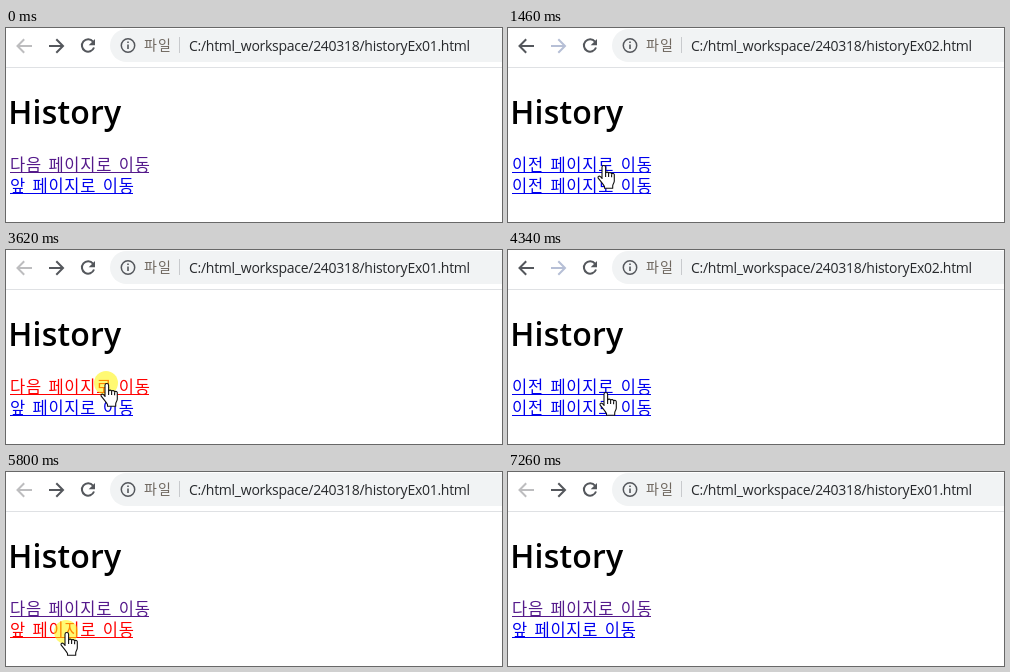
An HTML page that plays this animation: 496 px wide and 194 px high, repeating every 8050 ms.

```html
<!DOCTYPE html>
<html lang="ko">
<head>
<meta charset="utf-8">
<title>History</title>
<style>
  html, body { margin: 0; width: 100%; height: 100%; overflow: hidden; background: #fff; }
  svg { display: block; }
  .ko { font-family: "Noto Sans CJK KR", "Noto Sans CJK", "Noto Sans CJK JP", sans-serif; font-weight: 350; }
  .link { font-size: 16.5px; letter-spacing: .8px; word-spacing: 1px; }
  .link path { stroke: currentColor; }
  .link text { fill: currentColor; }
  .latin { font-family: "Open Sans", "Noto Sans", sans-serif; }
  .icon { fill: none; stroke: #54575c; stroke-width: 2; }
</style>
</head>
<body>
<svg width="496" height="194" viewBox="0 0 496 194">
  <rect width="496" height="194" fill="#fff"/>
  <path d="M0 39.5H496" stroke="#dfe1e4"/>
  <path id="back" class="icon" d="M26 18H12M18.2 11.3L11.5 18L18.2 24.7"/>
  <path id="forward" class="icon" d="M43 18H56.5M50.3 11.3L57 18L50.3 24.7"/>
  <path class="icon" d="M87 13.6A6.2 6.2 0 1 0 88 19.5"/>
  <path d="M89 11V17.3H82.7Z" fill="#54575c"/>
  <rect x="104" y="1" width="430" height="33" rx="16.5" fill="#f1f3f4"/>
  <circle cx="122" cy="17.5" r="6.7" fill="none" stroke="#54575c" stroke-width="1.5"/>
  <path d="M122 16.5V21M122 13.5V15" stroke="#54575c" stroke-width="1.6"/>
  <text class="ko" x="138" y="22" font-size="14" letter-spacing="1.2" fill="#6f675f">파일</text>
  <path d="M173.5 9V25" stroke="#c8cacd"/>
  <text id="url" class="latin" x="183" y="22.6" font-size="14" letter-spacing="-.28" fill="#27292c"></text>
  <text class="latin" x="2.3" y="96" font-size="32" font-weight="600" letter-spacing=".2">History</text>
  <g id="link0" class="ko link"><text x="4" y="143"></text><path/></g>
  <g id="link1" class="ko link"><text x="4" y="164"></text><path/></g>
  <circle id="glow" r="12" fill="#fff400" fill-opacity=".55"/>
  <g id="hand" fill="#fff" stroke="#111" stroke-width="1.1" stroke-linejoin="round">
    <path d="M-1 14V2.3a1.8 1.8 0 0 1 3.6 0V8a1.6 1.6 0 0 1 3 .4a1.6 1.6 0 0 1 3 .7a1.5 1.5 0 0 1 2.7 1.2V16c0 2-1.6 3-1.6 5v2.3H1.5v-1.8C0 19-2.5 16-4.8 13.2c-.8-1.4.8-2.8 2.2-1.6L-1 13.2"/>
    <path fill="none" d="M2.6 7.5V12M5.6 8.4V12M8.6 9.4V12.3"/>
  </g>
  <path id="arrow" fill="#fff" stroke="#111" d="M.5.8V16.5L4 13.2L6.3 18.5L8.5 17.5L6.3 12.4H11.3Z"/>
</svg>
<script>
const LOOP = 8050, STEP = 66;
const $ = id => document.getElementById(id);
const BLUE = '#0000ee', VISITED = '#551a8b', RED = '#ff0000';
const DARK = '#54575c', FAINT_BACK = '#bdbdbf', FAINT_FORWARD = '#b6bfd6';

const pages = [
  { url: 'historyEx01', links: ['다음 페이지로 이동', '앞 페이지로 이동'], colors: [VISITED, BLUE], ends: [143, 127] },
  { url: 'historyEx02', links: ['이전 페이지로 이동', '이전 페이지로 이동'], colors: [BLUE, BLUE], ends: [143, 143] }
];
// Times at which the other page opens
const turns = [1330, 2800, 3810, 5060, 5930, 6990];
// Press start, press end, link
const clicks = [[1130, 1260, 0], [2600, 2800, 1], [3620, 3750, 0], [4930, 5000, 1], [5800, 5930, 1], [6860, 6990, 1]];
// Start, number of steps, end point, optional control point
const moves = [
  [270, 11, [95, 139]],
  [1390, 2, [95, 137]],
  [1930, 2, [95, 151]],
  [2200, 2, [100, 154]],
  [3220, 2, [100, 133]],
  [4340, 6, [67, 160], [80, 200]],
  [5260, 2, [60, 160]],
  [7190, 1, [65, 160]]
];
const SHOW = 270, HIDE = 7260;

function pointer(t) {
  let from = [330, 192];
  for (const [start, steps, to, bend] of moves) {
    if (t < start) break;
    const p = Math.min(1, (Math.floor((t - start) / STEP) + 1) / steps);
    const e = p * p * (3 - 2 * p);
    from = from.map((a, i) => {
      const mid = bend ? bend[i] : (a + to[i]) / 2;
      return (1 - e) * (1 - e) * a + 2 * e * (1 - e) * mid + e * e * to[i];
    });
  }
  return from.map(Math.round);
}

function place(el, x, y, visible) {
  el.setAttribute('transform', `translate(${x} ${y})`);
  el.setAttribute('visibility', visible ? 'visible' : 'hidden');
}

function render(t) {
  const index = turns.filter(at => t >= at).length % 2;
  const page = pages[index];
  const click = clicks.find(([a, b]) => t >= a && t < b);
  $('url').textContent = `C:/html_workspace/240318/${page.url}.html`;
  $('back').style.stroke = index ? DARK : FAINT_BACK;
  $('forward').style.stroke = index ? FAINT_FORWARD : DARK;
  page.links.forEach((label, i) => {
    const [text, line] = $('link' + i).children;
    text.textContent = label;
    line.setAttribute('d', `M4 ${144.5 + 21 * i}H${page.ends[i]}`);
    $('link' + i).style.color = click && click[2] === i ? RED : page.colors[i];
  });
  const [x, y] = pointer(t);
  const shown = t >= SHOW && t < HIDE;
  const onLink = x < 144 && y > 127 && y < 169;
  place($('hand'), x, y, shown && onLink);
  place($('arrow'), x, y, shown && !onLink);
  place($('glow'), x, y, !!click);
}

const begin = performance.now();
function tick(now) {
  render(Math.max(0, now - begin) % LOOP);
  requestAnimationFrame(tick);
}
render(0);
requestAnimationFrame(tick);
</script>
</body>
</html>
```
